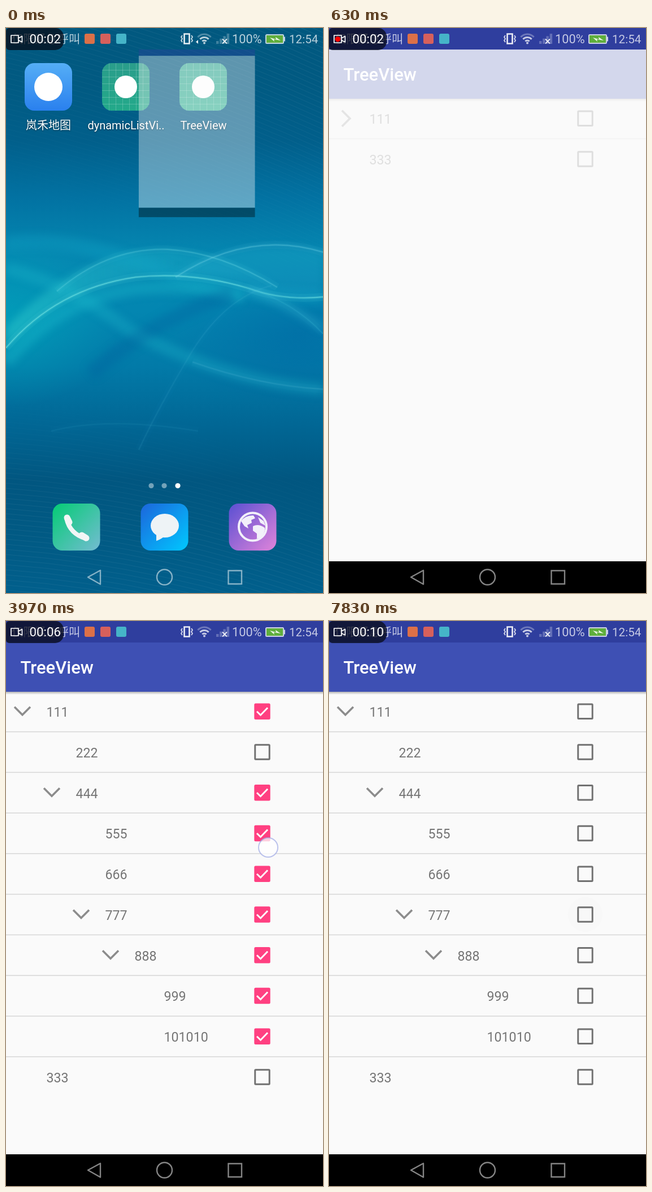
An HTML page with a canvas that plays this animation: 561x998 px, repeating every 8000 ms.

```html
<!DOCTYPE html>
<html lang="zh">
<head>
<meta charset="utf-8">
<title>TreeView</title>
<style>
html, body { margin: 0; width: 100%; height: 100%; overflow: hidden; background: #000; }
canvas { display: block; }
</style>
</head>
<body>
<canvas id="stage" width="561" height="998"></canvas>
<script>
const W = 561, H = 998, LOOP = 8000;
const c = document.getElementById('stage').getContext('2d');
const FONT = 'Roboto, "Noto Sans CJK SC", "Noto Sans CJK", sans-serif';
const clamp = v => Math.max(0, Math.min(1, v));
const ramp = (t, a, b) => clamp((t - a) / (b - a));
const mix = (a, b, p) => a + (b - a) * p;
const white = a => `rgba(255,255,255,${a})`;

// ---- drawing helpers ----
function rect(x, y, w, h, color) { c.fillStyle = color; c.fillRect(x, y, w, h); }
function round(x, y, w, h, r, color) {
  c.fillStyle = color; c.beginPath(); c.roundRect(x, y, w, h, r); c.fill();
}
function disc(x, y, r, color) {
  c.fillStyle = color; c.beginPath(); c.arc(x, y, r, 0, 7); c.fill();
}
function ring(x, y, r, color, width) {
  c.strokeStyle = color; c.lineWidth = width;
  c.beginPath(); c.arc(x, y, r, 0, 7); c.stroke();
}
function line(d, color, width, cap = 'butt') {
  c.strokeStyle = color; c.lineWidth = width; c.lineCap = cap;
  c.lineJoin = cap === 'round' ? 'round' : 'miter';
  c.stroke(new Path2D(d));
}
function shape(d, color) { c.fillStyle = color; c.fill(new Path2D(d)); }
function text(s, x, y, size, color, align = 'left', weight = 400) {
  c.font = `${weight} ${size}px ${FONT}`;
  c.textAlign = align; c.fillStyle = color; c.fillText(s, x, y);
}
function gradient(x0, y0, x1, y1, ...colors) {
  const g = c.createLinearGradient(x0, y0, x1, y1);
  colors.forEach((k, i) => g.addColorStop(i / (colors.length - 1), k));
  return g;
}
function glow(x, y, rx, ry, rgb, alpha) {
  c.save(); c.translate(x, y); c.scale(rx, ry);
  const g = c.createRadialGradient(0, 0, 0, 0, 0, 1);
  g.addColorStop(0, `rgba(${rgb},${alpha})`); g.addColorStop(1, `rgba(${rgb},0)`);
  rect(-1, -1, 2, 2, g); c.restore();
}

// ---- home screen ----
function wallpaper() {
  rect(0, 0, W, H, gradient(0, 0, 0, H, '#01587f', '#015a82', '#015f8b', '#0272a2', '#0587b1',
    '#0386b1', '#027aa8', '#016795', '#015680', '#015a84', '#015f8c'));
  glow(0, 520, 200, 150, '0,185,195', .45);
  glow(520, 540, 240, 130, '0,95,160', .45);

  for (let y = -200; y < 300; y += 9) line(`M0 ${y} Q300 ${y + 70} 561 ${y + 190}`, white(.05 * (1 - y / 320)), 1);
  for (let y = 660; y < 1000; y += 9) line(`M0 ${y} Q280 ${y + 20} 561 ${y + 120}`, white(.06 * ramp(y, 640, 850)), 1);

  // soft bands of light
  c.filter = 'blur(7px)';
  shape('M0 530 Q130 391 285 393 Q400 400 480 458 Q330 425 230 440 Q90 465 0 565Z',
    gradient(0, 0, W, 0, 'rgba(60,215,210,.4)', 'rgba(40,195,210,.3)', 'rgba(30,160,200,.15)'));
  shape('M285 440 Q430 360 561 395 L561 475 Q490 482 430 460 Q360 440 285 440Z', 'rgba(40,180,210,.25)');
  line('M0 380 Q130 365 300 440 Q400 470 561 478', 'rgba(20,170,200,.28)', 26);
  line('M0 425 Q110 450 220 535 Q390 625 561 638', 'rgba(30,185,205,.3)', 22);
  line('M0 590 Q90 480 230 460 Q330 450 420 475', 'rgba(30,190,205,.35)', 24);
  line('M430 462 Q510 495 561 530', 'rgba(60,190,215,.3)', 14);
  line('M400 470 Q270 510 150 610', 'rgba(0,95,155,.3)', 26);
  c.filter = 'none';

  const streaks = [
    ['M0 565 Q90 460 230 440 Q330 430 430 460 Q490 482 561 475', '110,225,225', .7],
    ['M90 465 Q180 388 285 391 Q380 396 480 458', '110,215,225', .35],
    ['M300 440 Q430 356 561 396', '120,215,230', .4],
    ['M430 460 Q510 485 561 540', '70,190,215', .25],
    ['M470 455 Q390 475 330 570 Q270 670 235 745', '90,195,220', .12],
    ['M330 590 Q450 632 561 638', '110,200,220', .2],
    ['M80 712 Q180 686 340 712', '70,180,205', .1]
  ];
  for (const [d, rgb, a] of streaks) {
    line(d, `rgba(${rgb},${a * .12})`, 14);
    line(d, `rgba(${rgb},${a * .25})`, 5);
    line(d, `rgba(${rgb},${a})`, 1.3);
  }
}

function gridTile(x, from, to) {
  round(x, 62, 84, 84, 17, gradient(0, 62, 0, 146, from, to));
  for (let k = 1; k < 7; k++) {
    rect(x + k * 12, 62, 1, 84, white(.2));
    rect(x, 62 + k * 12, 84, 1, white(.2));
  }
  disc(x + 42, 104, 20, '#fff');
}

function label(s, x) {
  c.shadowColor = 'rgba(0,0,0,.5)'; c.shadowBlur = 3; c.shadowOffsetY = 1;
  text(s, x, 179, 20, '#fff', 'center');
  c.shadowColor = 'transparent'; c.shadowBlur = c.shadowOffsetY = 0;
}

function dockTile(x, from, to) {
  round(x, 840, 84, 83, 17, gradient(x, 840, x + 84, 923, from, to));
}

function home() {
  wallpaper();
  round(33, 62, 84, 84, 17, gradient(0, 62, 0, 146, '#55aef6', '#2a80ee'));
  disc(75, 104, 25, '#fff');
  gridTile(170, '#2a9d8b', '#23a98a');
  gridTile(307, '#3fae9b', '#42b99d');
  label('岚禾地图', 75);
  label('dynamicListVi..', 212.5);
  label('TreeView', 349.5);

  [257, 280, 304].forEach((x, i) => disc(x, 808.5, 4.6, white(i < 2 ? .45 : 1)));

  dockTile(82.5, '#04cc74', '#74bcd2');
  line('M107 866 Q113 894 142 902', '#f2f6f6', 8, 'round');
  line('M108 865 l4 8 M134 896 l8 5', '#f2f6f6', 11, 'round');

  dockTile(238.5, '#1c66dc', '#00c8ff');
  c.fillStyle = '#eef3f6';
  c.beginPath(); c.ellipse(281, 879, 25, 21, 0, 0, 7); c.fill();
  shape('M266 893 L266 906 Q275 903 281 897Z', '#eef3f6');

  dockTile(394.5, '#5a50d2', '#e084da');
  ring(436.5, 881, 24.5, '#f2f0fa', 4);
  shape('M416 871 Q424 860 438 861 L441 866 L434 869 L435 874 L427 878 L429 884 L422 880 Z', '#f2f0fa');
  shape('M437 880 Q447 875 458 883 Q459 893 449 901 L444 902 L444 893 L437 888 Z', '#f2f0fa');
  shape('M446 864 L456 871 L459 879 L450 874 Z', '#f2f0fa');
}

// ---- tree app ----
const ROWS = [
  ['111', 0, 1], ['222', 1], ['444', 1, 1], ['555', 2], ['666', 2],
  ['777', 2, 1], ['888', 3, 1], ['999', 4], ['101010', 4], ['333', 0]
];
const PITCH = 71.75, BOX_X = 453.5, EXPAND = 1480, MORPH = 520;
const rowY = i => 159.7 + PITCH * i;
// touch position, row, press time, release time, time at which the box toggles
const TAPS = [
  { x: 205, y: 168, down: 1230, up: 1420 },
  { x: 466, y: 322, row: 2, down: 2600, up: 3060, toggle: 3200 },
  { x: 464, y: 400, row: 3, down: 3970, up: 4360, toggle: 4450 },
  { x: 466, y: 466, row: 4, down: 5750, up: 6130, toggle: 6250 },
  { x: 468, y: 534, row: 5, down: 6820, up: 7160, toggle: 7250 }
];

function checkbox(y, row, t) {
  const checks = row !== 1 && row !== 9;
  const off = { 3: 4450, 4: 6250 }[row] ?? 7250;
  let fill = 0, mark = 0, color = '#717171';
  if (checks && t >= off) {
    const p = (t - off) / MORPH;
    mark = 1 - ramp(p, 0, .3); fill = 1 - ramp(p, .3, .7);
  } else if (checks && t >= 3200) {
    const p = (t - 3200) / MORPH;
    color = '#ff4081'; fill = ramp(p, 0, .4); mark = ramp(p, .4, .9);
  }
  const hole = 22.5 * (1 - fill);
  c.fillStyle = color; c.beginPath();
  c.roundRect(BOX_X - 14.2, y - 14.2, 28.4, 28.4, 2.5);
  if (hole > 0) c.rect(BOX_X - hole / 2, y - hole / 2, hole, hole);
  c.fill('evenodd');
  if (mark > 0) {
    c.setLineDash([27.5 * mark, 99]);
    line(`M444 ${y} l6.5 6.5 L463 ${y - 6.5}`, '#fff', 3);
    c.setLineDash([]);
  }
}

function chevron(x, y, open) {
  line(open ? `M${x - 14} ${y - 8} l14 14 l14 -14` : `M${x - 6} ${y - 14} l14 14 l-14 14`, '#8c8c8c', 3.6);
}

function ripples(t) {
  for (const { row, down, toggle } of TAPS) {
    if (row === undefined) continue;
    const grow = ramp(t, down + 100, down + 350);
    const alpha = .065 * grow * (1 - ramp(t, toggle + 290, toggle + 610));
    if (alpha > 0) disc(BOX_X, rowY(row), mix(12, 31, grow), `rgba(0,0,0,${alpha})`);
  }
}

function list(t) {
  const open = t >= EXPAND;
  const press = ramp(t, 1300, 1420) * (1 - ramp(t, 1560, 1850));
  if (press > 0) rect(0, 125, W, 71, `rgba(0,0,0,${.08 * press})`);
  ripples(t);
  let slot = 0;
  ROWS.forEach(([name, level, parent], row) => {
    if (!open && row > 0 && row < 9) return;
    const y = rowY(slot++), x = 52 * level;
    if (parent) chevron(29 + x, y, open);
    text(name, 71.5 + x, y + 9.3, 23.2, '#757575');
    checkbox(y, row, t);
    if (row < 9) rect(0, y + 35.2, W, 1.5, '#d6d6d6');
  });
}

function app(t) {
  rect(0, 0, W, H, '#fafafa');
  rect(0, 0, W, 38, '#2f3e9e');
  rect(0, 942, W, 56, '#000');
  const shown = ramp(t, 580, 830);
  if (!shown) return;
  c.globalAlpha = shown;
  list(t);
  rect(0, 125, W, 5, gradient(0, 125, 0, 130, 'rgba(0,0,0,.28)', 'rgba(0,0,0,0)'));
  rect(0, 38, W, 87, '#3e50b4');
  c.globalAlpha = 1;
  text('TreeView', 25.5, 93, 31, '#fff', 'left', 500);
}

// opening window, growing and turning opaque
const OPENING = 425;
function appWindow(t) {
  const p = 1 - (1 - t / OPENING) ** 2;
  const x = mix(236, 0, p), y = mix(38, 0, p), w = mix(204, W, p), h = mix(293, H, p);
  const top = h * 38 / H, base = h * 942 / H;
  c.globalAlpha = clamp(.37 + t / 345);
  rect(x, y, w, top, '#2f3e9e');
  rect(x, y + top, w, base - top, '#fafafa');
  rect(x, y + base, w, h - base, '#000');
  c.globalAlpha = 1;
}

// ---- system bars and overlays ----
function statusBar(t) {
  const ink = white(.72), dim = white(.3);
  text('仅限紧急呼叫', 10, 27, 20.2, ink);
  ['#dc7048', '#d6605c', '#45b4c8'].forEach((k, i) => round(139 + 28 * i, 10, 18, 18, 3, k));

  line('M315.5 10.5 h9 v17 h-9 z', white(.9), 2.6);
  line('M312 13 l-2 3 l2 3 l-2 3 l2 3 M328 13 l2 3 l-2 3 l2 3 l-2 3', white(.8), 1.8);

  [[5, ink], [10.5, ink], [16, dim]].forEach(([r, color]) => {
    c.strokeStyle = color; c.lineWidth = 3; c.lineCap = 'butt';
    c.beginPath(); c.arc(351, 27, r, -Math.PI * .76, -Math.PI * .24); c.stroke();
  });
  disc(351, 26.5, 2, ink);
  if (t < 450 || (t >= 2270 && t < 2370)) shape('M336 24.5 l4 -3.5 v7 z', white(.9));

  for (let k = 0; k < 4; k++) rect(372 + 6.2 * k, 23 - 4.3 * k, 4.5, 5 + 4.3 * k, white(.25));
  line('M383 19.5 l8 8 m0 -8 l-8 8', white(.9), 1.8);

  text('100%', 400, 27, 21.8, ink);
  round(459, 11, 33, 17, 2.5, white(.75));
  rect(492, 15.5, 2, 8, white(.75));
  rect(461, 13, 29, 13, '#5fae3c');
  shape('M467 17 L478 20 L477 16 L486 22 L474 20 L475 24 Z', white(.9));
  text('12:54', 501, 27, 20.6, ink);
}

function navBar() {
  const ink = white(.52);
  line('M145 970 L167 958 V982.5 Z', ink, 2.4, 'round');
  ring(280.5, 970, 13.5, ink, 2.4);
  line('M393.5 958.5 h23.5 v23.5 h-23.5 z', ink, 2.4);
}

function recorder(t) {
  round(0, 0, 102, 39, [6, 15, 15, 6], 'rgba(8,10,22,.74)');
  line('M9 13 h13 v13 h-13 z M22 18 L28.5 14.5 V25 L22 21.5', '#fff', 1.7, 'round');
  if (t % 978 >= 400) disc(15.5, 19.7, 4.8, '#f00');
  const seconds = Math.floor(t / 1000 + 2.2);
  text('00:' + String(seconds).padStart(2, '0'), 41.5, 27.3, 22.3, '#fff');
}

function touch(t) {
  const tap = TAPS.find(k => t >= k.down && t < k.up);
  if (!tap) return;
  disc(tap.x, tap.y, 17, white(.75));
  ring(tap.x, tap.y, 17, 'rgba(160,170,230,.7)', 2);
}

function frame() {
  const t = performance.now() % LOOP;
  if (t < OPENING) { home(); appWindow(t); } else app(t);
  statusBar(t);
  navBar();
  recorder(t);
  touch(t);
  requestAnimationFrame(frame);
}
frame();
</script>
</body>
</html>
```
